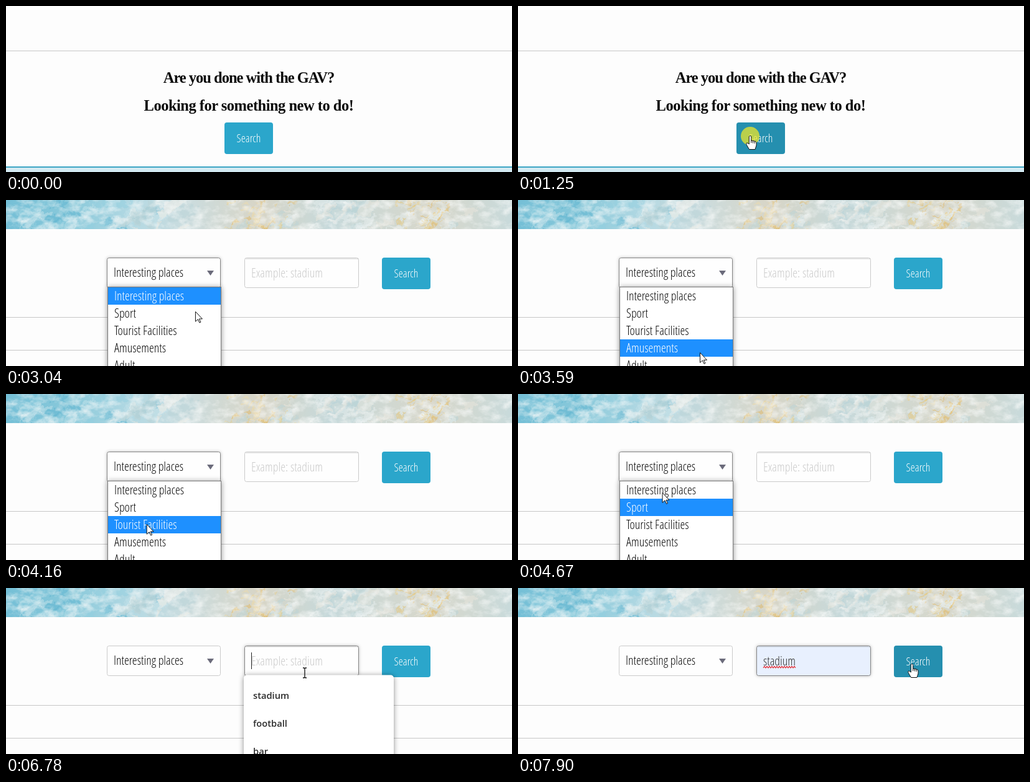
Write an HTML page that moves like this. It is 813 px wide and 268 px high and loops after 8000 ms.

```html
<!DOCTYPE html>
<html lang="en">
<head>
<meta charset="utf-8">
<title>Place search</title>
<style>
  html, body { margin: 0; width: 100%; height: 100%; overflow: hidden; background: #fdfdfd; }
  svg { display: block; width: 813px; height: 268px; }
  text { white-space: pre; }
  .ui { font: 300 20px "Open Sans Condensed Light", "Open Sans", sans-serif; font-stretch: condensed; }
  .small { font-size: 18px; }
  .mid { text-anchor: middle; }
  .head { font: 700 24.5px "Liberation Serif", serif; fill: #0a0a0a; text-anchor: middle; }
  .tip { font: 600 14.7px "Open Sans", "Noto Sans", sans-serif; fill: #2b2b2b; }
  .rule { stroke: #c6c6c6; }
  .box { fill: #fefefe; stroke: #cacaca; }
  .focus { stroke: #858585; filter: drop-shadow(0 0 2.5px #bbb); }
  .pop { filter: drop-shadow(0 1px 4px rgba(0, 0, 0, .45)); }
  .glyph { fill: #fff; stroke: #111; stroke-linejoin: round; }
</style>
</head>
<body>
<svg id="stage" viewBox="0 0 813 268" xmlns="http://www.w3.org/2000/svg">
  <defs>
    <linearGradient id="paint">
      <stop offset="0" stop-color="#74bfd6"/>
      <stop offset=".14" stop-color="#8ccadb"/>
      <stop offset=".25" stop-color="#b4d9e3"/>
      <stop offset=".36" stop-color="#cbdcde"/>
      <stop offset=".5" stop-color="#d8d5c6"/>
      <stop offset=".64" stop-color="#c6d9db"/>
      <stop offset=".84" stop-color="#d8d7ca"/>
      <stop offset="1" stop-color="#c8dadb"/>
    </linearGradient>
    <filter id="rough" x="0" y="0" width="813" height="47" filterUnits="userSpaceOnUse">
      <feTurbulence type="fractalNoise" baseFrequency=".09" numOctaves="4" seed="4"/>
      <feDisplacementMap in="SourceGraphic" scale="20" xChannelSelector="R" yChannelSelector="G"/>
    </filter>
    <filter id="grain" x="0" y="0" width="813" height="47" filterUnits="userSpaceOnUse">
      <feTurbulence type="fractalNoise" baseFrequency=".05 .08" numOctaves="5" seed="9"/>
      <feColorMatrix values="0 0 0 0 .95  0 0 0 0 .96  0 0 0 0 .95  2.4 0 0 0 -1"/>
    </filter>
    <clipPath id="band"><rect width="813" height="47"/></clipPath>
  </defs>
  <rect width="813" height="268" fill="#fdfdfd"/>
</svg>
<script>
const LOOP = 8000, TICK = 77;
const stage = document.getElementById('stage');

// Narrow the UI face only where no condensed cut is available.
const pen = document.createElement('canvas').getContext('2d');
pen.font = '300 condensed 20px "Open Sans Condensed Light", "Open Sans", sans-serif';
const narrow = pen.measureText('Interesting places').width > 132 ? 0.75 : 1;

function add(parent, tag, attrs = {}, content = '') {
  const el = document.createElementNS('http://www.w3.org/2000/svg', tag);
  for (const key in attrs) el.setAttribute(key, attrs[key]);
  el.textContent = content;
  return parent.appendChild(el);
}
const group = parent => add(parent, 'g');
const rect = (p, x, y, width, height, attrs) => add(p, 'rect', { x, y, width, height, ...attrs });
const rule = (p, y) => add(p, 'path', { d: `M0 ${y}H813`, class: 'rule' });
const ui = (p, x, y, str, fill = '#0a0a0a', cls = '') =>
  add(p, 'text', { class: 'ui ' + cls, fill, transform: `translate(${x} ${y}) scale(${narrow} 1)` }, str);
const show = (el, on) => el.setAttribute('visibility', on ? 'inherit' : 'hidden');
const paint = (el, color) => el.setAttribute('fill', color);
const clamp = (v, lo, hi) => Math.min(hi, Math.max(lo, v));

function button(p, x, y) {
  const face = rect(p, x, y, 78, 51, { rx: 4 });
  ui(p, x + 39, y + 32, 'Search', '#fefefe', 'small mid');
  return { face, x, y, w: 78, h: 51 };
}

function field(p, x) {
  const box = rect(p, x + 0.5, 93.5, 183, 48, { rx: 3 });
  return { box, x, y: 93, w: 184, h: 49 };
}

function banner(p) {
  const art = add(p, 'g', { 'clip-path': 'url(#band)' });
  rect(art, 0, 0, 813, 47, { fill: 'url(#paint)' });
  const blobs = add(art, 'g', { filter: 'url(#rough)' });
  let seed = 11;
  const rnd = () => (seed = seed * 16807 % 2147483647) / 2147483647;
  const scatter = (n, x, spread, colors, size) => {
    for (let i = 0; i < n; i++) {
      const cx = x + (rnd() + rnd() - 1) * spread, cy = rnd() * 62;
      const r = size * (0.4 + rnd());
      add(blobs, 'ellipse', {
        cx, cy, rx: r, ry: r * 0.3, opacity: 0.5,
        fill: colors[Math.floor(rnd() * colors.length)],
        transform: `rotate(${-50 + rnd() * 40} ${cx} ${cy})`
      });
    }
  };
  const blues = ['#5fb4d0', '#c2e2ea', '#93cfdf'], pale = ['#e9e6dc', '#b9d3d8', '#e6eeee'];
  const gold = ['#e8c777', '#dfb660', '#efdca8'];
  scatter(36, 110, 150, blues, 20);
  scatter(14, 235, 60, pale, 22);
  scatter(45, 560, 260, pale, 18);
  scatter(50, 405, 65, gold, 6);
  scatter(45, 680, 60, gold, 6);
  rect(art, 0, 0, 813, 47, { filter: 'url(#grain)', opacity: 0.7 });
}

// First page
const home = group(stage);
rule(home, 72.5);
add(home, 'text', { class: 'head', x: 390, y: 124, 'letter-spacing': -1 }, 'Are you done with the GAV?');
add(home, 'text', { class: 'head', x: 390, y: 169, 'letter-spacing': -0.5 }, 'Looking for something new to do!');
const homeButton = button(home, 351, 188);
rect(home, 0, 259, 813, 2, { fill: '#3ba5c4' });
rect(home, 0, 261, 813, 7, { fill: '#d3eaf2' });

// Second page
const find = group(stage);
banner(find);
rule(find, 189.5);
rule(find, 242.5);
const findButton = button(find, 604, 93);

const input = field(find, 383);
add(find, 'path', { d: 'M385 95H566', stroke: '#0a0a0a', opacity: 0.08, 'stroke-width': 2 });
const hint = ui(find, 394, 125, 'Example: stadium', '#cacaca');
const caret = add(find, 'path', { d: 'M394.5 104V131', stroke: '#222' });
const entry = ui(find, 394, 125, 'stadium', '#333');
const wave = add(find, 'path', {
  d: 'M394 129' + 'l2 -2.5l2 2.5'.repeat(13), fill: 'none', stroke: '#e5252a', 'stroke-width': 1.2
});
const tips = group(find);
rect(tips, 382, 140.5, 241, 150, { rx: 5, fill: '#fff', class: 'pop' });
const tipBar = rect(tips, 382, 151, 241, 45, { fill: '#f1f1f2' });
['stadium', 'football', 'bar'].forEach((word, i) =>
  add(tips, 'text', { class: 'tip', x: 397, y: 179 + i * 45 }, word));

const select = field(find, 162);
select.box.setAttribute('width', 182);
ui(find, 173, 124, 'Interesting places');
add(find, 'path', { d: 'M323 114h11l-5.5 8z', fill: '#6b6b7b' });
const menu = group(find);
rect(menu, 163.5, 140.5, 182, 140, { fill: '#fff', stroke: '#777', class: 'pop' });
const menuBar = rect(menu, 164, 141, 181, 28, { fill: '#1e90ff' });
const options = ['Interesting places', 'Sport', 'Tourist Facilities', 'Amusements', 'Adult']
  .map((name, i) => ui(menu, 174, 162 + i * 28, name));

// Pointer
const pointer = group(stage);
const halo = add(pointer, 'circle', { r: 15, fill: '#f4e926', opacity: 0.72 });
const glyph = (d, attrs) => add(pointer, 'path', { d, class: 'glyph', ...attrs });
const arrow = glyph('M.5 .5V16.5L4.5 13L7 18.5L9 17.5L6.5 12.3H11.5Z');
const hand = glyph('M-1.7 .5Q0 -1.6 1.7 .5V7L4.3 7.4L7 8.2L9 9Q10 10 10 12V15L8 21.5H-1.5L-5.5 14.5'
  + 'Q-7 12 -5.5 11Q-4 10.6 -1.7 13ZM1.7 7V11M4.3 7.5V11.5M7 8.5V12');
const beam = glyph('M-3 -8H-1L0 -7L1 -8H3M0 -7V7M-3 8H-1L0 7L1 8H3', { 'fill-opacity': 0, 'stroke-width': 1.3 });

// Each move: start, end, x, y
const moves = [
  [70, 840, 373, 210], [1790, 1955, 289, 92], [1985, 2400, 315, 118], [2890, 3440, 292, 246],
  [3590, 3750, 238, 126], [3920, 4320, 223, 228], [4550, 4750, 232, 155], [5130, 5280, 232, 166],
  [5840, 6080, 486, 121], [6700, 6770, 480, 137], [6830, 7090, 464, 169], [7360, 7800, 633, 123]
];
const [goClick, openClick, pickClick, inputClick, tipClick] = [1250, 2480, 5675, 6310, 7260];
const clicks = [goClick, openClick, pickClick, inputClick, tipClick];

// Ease-out between stops, in ticks like a screen recording.
function pointerAt(t) {
  let x = 645, y = 245;
  for (const [from, to, toX, toY] of moves) {
    if (t < from) break;
    const p = t >= to ? 1 : Math.min(1, Math.round((t - from) / TICK) * TICK / (to - from));
    const k = 1 - (1 - p) ** 2;
    x += (toX - x) * k;
    y += (toY - y) * k;
  }
  return { x, y };
}
const over = (pt, b) => pt.x >= b.x && pt.x < b.x + b.w && pt.y >= b.y && pt.y < b.y + b.h;

function render(t) {
  const at = pointerAt(t);
  const onHome = t < goClick + 170;
  show(home, onHome);
  show(find, !onHome);

  const target = onHome ? homeButton : findButton;
  const onButton = over(at, target);
  paint(target.face, onButton ? '#258faf' : '#2ba6cb');

  const inInput = t >= inputClick + 80;
  const menuOpen = t >= openClick + 75 && t < pickClick + 80;
  select.box.setAttribute('class', t >= openClick + 160 && !inInput ? 'box focus' : 'box');
  input.box.setAttribute('class', inInput ? 'box focus' : 'box');

  show(menu, !onHome && menuOpen);
  const row = clamp(Math.floor((pointerAt(t - 40).y - 141) / 28), 0, 4);
  menuBar.setAttribute('y', 141 + row * 28);
  options.forEach((label, i) => paint(label, i === row ? '#fff' : '#0a0a0a'));

  const tipsOpen = t >= inputClick + 225 && t < tipClick + 75;
  const onTip = tipsOpen && at.y >= 151;
  const filled = onTip || t >= tipClick;
  show(tips, tipsOpen);
  show(tipBar, onTip);
  show(hint, !onHome && !filled);
  show(entry, filled);
  show(caret, inInput && !filled);
  show(wave, t >= tipClick + 150);
  input.box.style.fill = filled ? '#e8f0fe' : '';

  const onInput = !onHome && over(at, input);
  pointer.setAttribute('transform', `translate(${at.x} ${at.y})`);
  show(pointer, t >= 70);
  show(hand, t >= 70 && onButton);
  show(beam, t >= 70 && onInput);
  show(arrow, t >= 70 && !onButton && !onInput);
  show(halo, clicks.some(c => t >= c && t < c + 165));
}

function frame(now) {
  render(now % LOOP);
  requestAnimationFrame(frame);
}
render(0);
requestAnimationFrame(frame);
</script>
</body>
</html>
```
